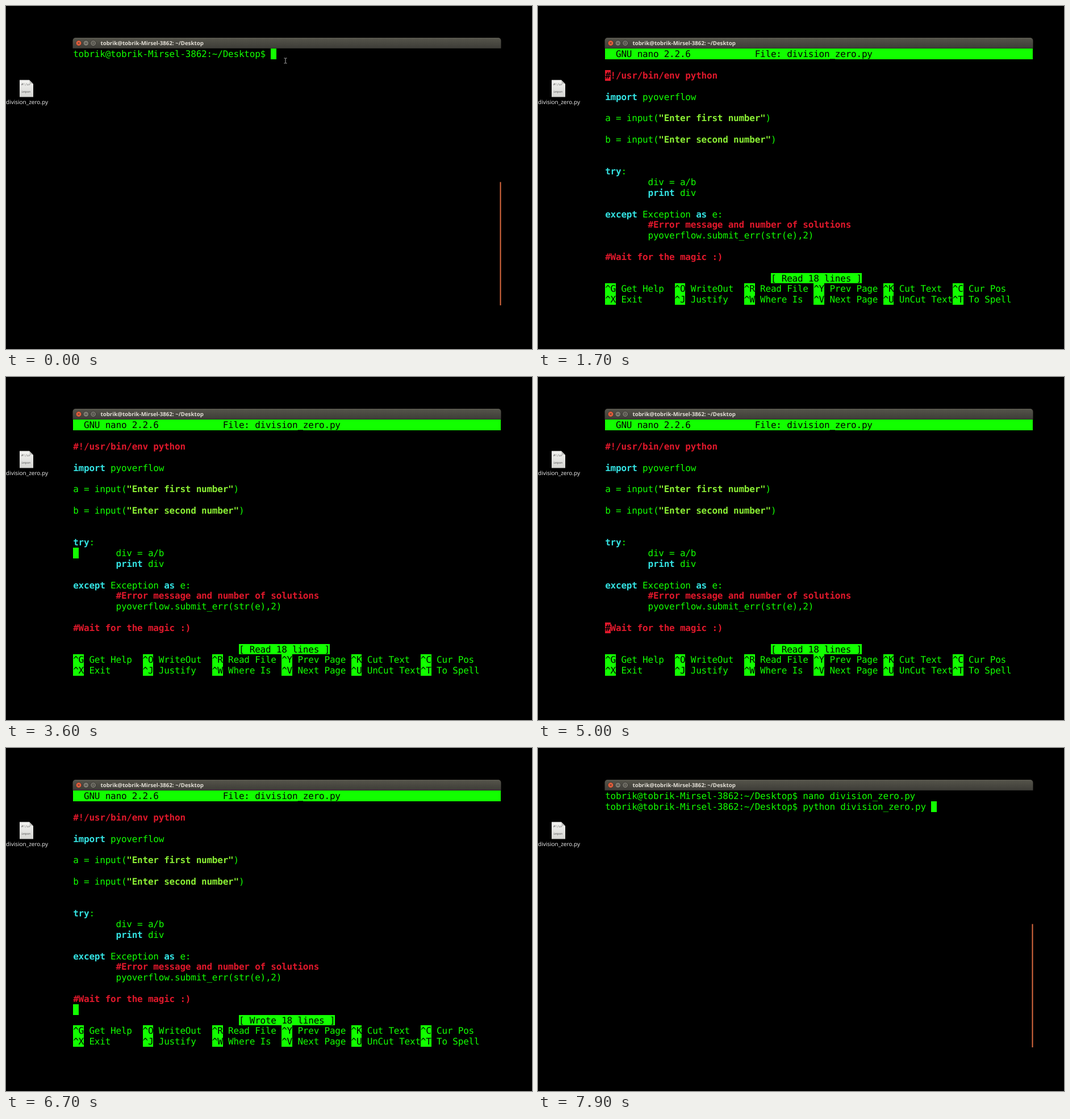
These frames come from a looping animation (926x605 px, 8000 ms). An HTML page with a canvas:

```html
<!DOCTYPE html>
<html lang="en">
<head>
<meta charset="utf-8">
<title>Terminal session</title>
<style>
  html, body { margin: 0; width: 100%; height: 100%; overflow: hidden; background: #000; }
  canvas { display: block; }
</style>
</head>
<body>
<canvas id="stage" width="926" height="605"></canvas>
<script>
const ctx = document.getElementById('stage').getContext('2d');
const LOOP = 8000;
const COLS = 80, X0 = 118.2, Y0 = 75.2, CELL_W = 9.41, CELL_H = 18.83;
const GREEN = '#12ff00', RED = '#e0182b', CYAN = '#34e2e2', LIME = '#8aef34', BLACK = '#000';
const MONO = '16px "DejaVu Sans Mono", monospace';
const USER = 'tobrik', HOST = 'tobrik-Mirsel-3862', FILE = 'division_zero.py';
const PROMPT = `${USER}@${HOST}:~/Desktop$ `;

const colX = c => Math.round(X0 + c * CELL_W);
const rowY = r => Math.round(Y0 + r * CELL_H);

// Latest entry of a [time, ...values] list that has started.
const at = (list, t) => list.filter(e => e[0] <= t).pop();

// Terminal cells, keyed by row and column
let cells;

function put(row, col, str, fg = GREEN, bold = false, bg = null) {
  [...str].forEach((ch, i) => cells.set(row * COLS + col + i, { ch, fg, bold, bg }));
}

const invert = (row, col, str) => put(row, col, str, BLACK, false, GREEN);

function cursor(row, col) {
  const old = cells.get(row * COLS + col) || { ch: ' ', fg: GREEN, bold: false };
  put(row, col, old.ch, BLACK, old.bold, old.bg ? BLACK : old.fg);
}

function paintCells() {
  for (const [key, cell] of cells) {
    if (!cell.bg) continue;
    const r = Math.floor(key / COLS), c = key % COLS;
    ctx.fillStyle = cell.bg;
    ctx.fillRect(colX(c), rowY(r), colX(c + 1) - colX(c), rowY(r + 1) - rowY(r));
  }
  for (const [key, cell] of cells) {
    if (cell.ch === ' ') continue;
    const r = Math.floor(key / COLS), c = key % COLS;
    ctx.font = (cell.bold ? 'bold ' : '') + MONO;
    ctx.fillStyle = cell.fg;
    ctx.fillText(cell.ch, X0 + c * CELL_W, Y0 + r * CELL_H + 15);
  }
}

// Editor content: row, column, then coloured runs
const CODE = [
  [2, 0, ['#!/usr/bin/env python', RED, true]],
  [4, 0, ['import', CYAN, true], [' pyoverflow']],
  [6, 0, ['a = input('], ['"Enter first number"', LIME, true], [')']],
  [8, 0, ['b = input('], ['"Enter second number"', LIME, true], [')']],
  [11, 0, ['try', CYAN, true], [':']],
  [12, 8, ['div = a/b']],
  [13, 8, ['print', CYAN, true], [' div']],
  [15, 0, ['except', CYAN, true], [' Exception '], ['as', CYAN, true], [' e:']],
  [16, 8, ['#Error message and number of solutions', RED, true]],
  [17, 8, ['pyoverflow.submit_err(str(e),2)']],
  [19, 0, ['#Wait for the magic :)', RED, true]]
];

const EDIT_KEYS = [
  ['^G Get Help', '^O WriteOut', '^R Read File', '^Y Prev Page', '^K Cut Text', '^C Cur Pos'],
  ['^X Exit', '^J Justify', '^W Where Is', '^V Next Page', '^U UnCut Text', '^T To Spell']
];
const SAVE_KEYS = [
  ['^G Get Help', 'M-D DOS Format', 'M-A Append', 'M-B Backup File'],
  ['^C Cancel', 'M-M Mac Format', 'M-P Prepend']
];

function helpKeys(rows, step) {
  rows.forEach((row, r) => row.forEach((item, i) => {
    const key = item.split(' ')[0];
    put(22 + r, i * step, item);
    invert(22 + r, i * step, key);
  }));
}

// Editor cursor: time, row, visible
const MOVES = [
  [1700, 2, 1], [2000, 2, 0], [2300, 2, 1], [2600, 3, 1], [2900, 5, 1], [3000, 8, 1],
  [3200, 9, 1], [4300, 16, 0], [4500, 17, 1], [4600, 18, 1], [4800, 19, 1],
  [5100, 20, 1], [5400, 20, 0], [5700, 20, 1]
];

function editCursor(t) {
  if (t >= 3400 && t < 4300) return [Math.min(16, 10 + Math.floor((t - 3400) / 100)), 1];
  return at(MOVES, t).slice(1);
}

function editor(t) {
  invert(0, 0, ('  GNU nano 2.2.6'.padEnd(28) + 'File: ' + FILE).padEnd(COLS));
  for (const [row, col, ...runs] of CODE) {
    let c = col;
    for (const [str, fg, bold] of runs) {
      put(row, c, str, fg, bold);
      c += str.length;
    }
  }
  if (t >= 6200 && t < 6700) {
    const ask = 'File Name to Write: ' + FILE;
    invert(21, 0, ask.padEnd(COLS));
    helpKeys(SAVE_KEYS, 20);
    if (t < 6500) cursor(21, ask.length);
    return;
  }
  invert(21, 31, t < 6200 ? '[ Read 18 lines ]' : '[ Wrote 18 lines ]');
  helpKeys(EDIT_KEYS, 13);
  const [row, on] = editCursor(t);
  if (on) cursor(row, 0);
}

// Typed commands: time, text so far
const OPEN = [
  [0, ''], [700, 'n'], [800, 'nan'], [900, 'nano '],
  [1200, 'nano d'], [1300, 'nano di'], [1400, `nano ${FILE} `]
];
const RUN = [
  [6900, ''], [7200, 'p'], [7300, 'py'], [7400, 'pyt'], [7500, 'pyth'],
  [7600, 'python'], [7700, 'python '], [7800, 'python di'], [7900, `python ${FILE} `]
];

function shell(t) {
  const second = t >= 6900;
  const typed = at(second ? RUN : OPEN, t)[1];
  const row = second ? 1 : 0;
  if (second) put(0, 0, PROMPT + 'nano ' + FILE);
  put(row, 0, PROMPT + typed);
  if (t < 200 || t >= 500) cursor(row, PROMPT.length + typed.length);
  ctx.fillStyle = '#dc6a40';
  ctx.fillRect(869.5, 310.5, 2, 217.5);
  if (t < 700) pointer();
}

function pointer() {
  ctx.fillStyle = '#b4b4b4';
  ctx.fillRect(491.5, 92, 1, 9);
  ctx.fillRect(489.5, 91.5, 2, 1);
  ctx.fillRect(492.5, 91.5, 2, 1);
  ctx.fillRect(489.5, 100.5, 2, 1);
  ctx.fillRect(492.5, 100.5, 2, 1);
}

function button(x, fill, mark) {
  ctx.beginPath();
  ctx.arc(x, 65.5, 4.9, 0, Math.PI * 2);
  ctx.fillStyle = fill;
  ctx.fill();
  ctx.strokeStyle = '#34332f';
  ctx.lineWidth = 0.9;
  ctx.stroke();
  ctx.beginPath();
  mark(x, 65.5);
  ctx.stroke();
}

function titleBar() {
  const shade = ctx.createLinearGradient(0, 56, 0, 75);
  shade.addColorStop(0, '#5c5b52');
  shade.addColorStop(0.15, '#525148');
  shade.addColorStop(1, '#3d3c37');
  ctx.fillStyle = shade;
  ctx.beginPath();
  ctx.roundRect(117.5, 56, 754, 18.8, [5, 5, 0, 0]);
  ctx.fill();
  button(128, '#e65f3c', (x, y) => {
    ctx.moveTo(x - 1.8, y - 1.8); ctx.lineTo(x + 1.8, y + 1.8);
    ctx.moveTo(x + 1.8, y - 1.8); ctx.lineTo(x - 1.8, y + 1.8);
  });
  button(140.8, '#7c7a70', (x, y) => { ctx.moveTo(x - 2, y); ctx.lineTo(x + 2, y); });
  button(153.6, '#7c7a70', (x, y) => ctx.rect(x - 1.8, y - 1.8, 3.6, 3.6));
  ctx.font = 'bold 9.7px "Open Sans", sans-serif';
  ctx.fillStyle = '#e2ded5';
  ctx.fillText(`${USER}@${HOST}: ~/Desktop`, 166.5, 69);
}

function desktopIcon() {
  const paper = ctx.createLinearGradient(0, 130, 0, 160);
  paper.addColorStop(0, '#f4f4f2');
  paper.addColorStop(1, '#d6d6d3');
  ctx.fillStyle = paper;
  ctx.beginPath();
  ctx.moveTo(24, 130.5);
  ctx.lineTo(41, 130.5);
  ctx.lineTo(48, 137.5);
  ctx.lineTo(48, 160.5);
  ctx.lineTo(24, 160.5);
  ctx.fill();
  ctx.fillStyle = '#bdbdba';
  ctx.beginPath();
  ctx.moveTo(41, 130.5);
  ctx.lineTo(48, 137.5);
  ctx.lineTo(42, 136.5);
  ctx.fill();
  ctx.font = '5.4px "DejaVu Sans Mono", monospace';
  ctx.fillStyle = '#5e5e5e';
  ctx.fillText('#!/ur', 27, 139.5);
  ctx.fillText('impon', 27, 153);
  ctx.font = '10px "Open Sans", sans-serif';
  ctx.fillStyle = '#f2f2f2';
  ctx.fillText(FILE, 0, 172.6);
}

function draw(t) {
  ctx.fillStyle = BLACK;
  ctx.fillRect(0, 0, 926, 605);
  ctx.textRendering = 'geometricPrecision';
  desktopIcon();
  titleBar();
  cells = new Map();
  if (t >= 1700 && t < 6900) editor(t);
  else shell(t);
  paintCells();
}

const start = performance.now();
function tick() {
  draw((performance.now() - start) % LOOP);
  requestAnimationFrame(tick);
}
tick();
</script>
</body>
</html>
```
